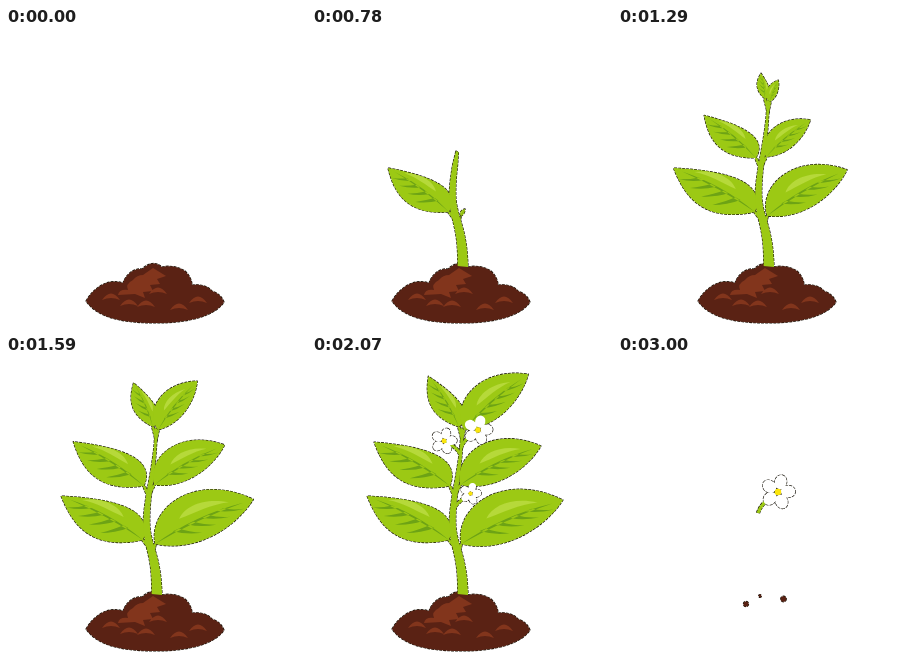
Recreate the animation shown at these times as an HTML page with a canvas. Size 300 by 300 pixels, loop 3.03 s.

```html
<!DOCTYPE html>
<html lang="en">
<head>
<meta charset="utf-8">
<title>Growing plant</title>
<style>
html, body { margin: 0; width: 100%; height: 100%; overflow: hidden; background: #fff; }
canvas { display: block; width: 300px; height: 300px; }
</style>
</head>
<body>
<canvas id="stage" width="300" height="300"></canvas>
<script>
const ctx = document.getElementById('stage').getContext('2d');
const LOOP = 3030, STEP = 30, FLASH = 3000;
const GREEN = '#9cc914', SHADE = '#6da315', LIGHT = '#b6d93a';
const SOIL = '#5a2214', CLOD = '#82351c', INK = '#161208';
const GROUND = 239, CROWN = 72;

const mound = new Path2D('M80 273C85 264 94 256 104 254Q111 253 117 255C120 246 128 240 136 241Q147 231 156 239C164 237 173 239 179 243Q186 250 186 257C194 256 202 258 206 263Q215 266 218 274C210 287 185 295 150 295C112 295 90 288 80 273Z');
const clods = new Path2D('M147 240L160 248L151 251L154 256L144 257L147 263L137 264L139 270L129 266L112 267Q113 261 122 262Q119 256 127 252Q131 247 137 247Z');
for (const [x, y] of [[105, 272], [123, 278], [140, 279], [152, 266], [173, 282], [192, 275]]) {
  clods.moveTo(x - 9, y);
  clods.quadraticCurveTo(x, y - 13, x + 9, y);
  clods.quadraticCurveTo(x, y - 4, x - 9, y);
}

// Leaf shapes run from the base (0, 0) to the tip (1, 0), upper side positive.
const shine = new Path2D('M.3 .12C.4 .21 .6 .2 .78 .07C.62 .12 .46 .11 .3 .12Z');
const leftLeaf = {
  edge: new Path2D('M0 0C.05 .34 .45 .26 1 0C.76 -.2 .45 -.38 0 0Z'),
  veins: veins(.16)
};
const rightLeaf = {
  edge: new Path2D('M0 0C.08 .34 .62 .45 1 0C.8 -.14 .35 -.26 0 0Z'),
  veins: veins(.09)
};

const leaves = [
  { base: [137, 184], tip: [55, 140], start: 270 },
  { base: [149, 188], tip: [251, 144], start: 750 },
  { base: [138, 130], tip: [62, 86], start: 830 },
  { base: [148, 129], tip: [229, 90], start: 940 },
  { base: [147, 71], tip: [116, 20], start: 1080 },
  { base: [152, 74], tip: [218, 18], start: 1170 }
];
const flowers = [
  { joint: [148, 98], center: [132, 85], start: 1700 },
  { joint: [149, 92], center: [166, 74], start: 1600 },
  { joint: [140, 157], center: [160, 136], start: 1795 }
];
const crumbs = [[128, 248, 2.6], [142, 240, 1.4], [165.5, 243, 2.8]];

const mix = (a, b, k) => a + (b - a) * k;

// Ease-out share of full size, for leaves and flowers alike
function grown(t, start, span) {
  const k = Math.min(1, Math.max(0, (t - start) / span));
  return 1 - (1 - k) ** 3;
}

function stemX(y) {
  const d = (y - 168) / (y > 168 ? 34 : 58);
  return 151 - 10.5 * Math.exp(-d * d);
}

function veins(depth) {
  const p = new Path2D('M0 0Q.45 .09 .9 .01Q.45 .05 0 0Z');
  for (let x = .2; x < .7; x += .15) {
    const drop = -depth * (1.15 - x);
    p.moveTo(x, .04);
    p.quadraticCurveTo(x + .1, drop * .5, x + .24, drop);
    p.quadraticCurveTo(x + .13, drop * .3, x + .06, .04);
  }
  return p;
}

function place(path, matrix) {
  const p = new Path2D();
  p.addPath(path, matrix);
  return p;
}

function leafParts({ base: [x, y], tip, start }, t) {
  const g = grown(t, start, 1200);
  if (!g) return [];
  const dx = tip[0] - x, dy = tip[1] - y, len = Math.hypot(dx, dy) * g;
  const side = dx < 0 ? 1 : -1;
  const shape = dx < 0 ? leftLeaf : rightLeaf;
  const lift = 40 * (1 - g) * side;   // young leaves point higher
  const m = new DOMMatrix().translate(x, y)
    .rotate(Math.atan2(dy, dx) * 180 / Math.PI + lift)
    .scale(len, len * side);
  const stalk = new Path2D();
  stalk.moveTo(stemX(y + 11), y + 11);
  stalk.lineTo(x, y);
  return [
    { path: stalk, color: GREEN, width: Math.min(2.6, len / 10) },
    { path: place(shape.edge, m), color: GREEN },
    { path: place(shine, m), color: LIGHT, bare: true },
    { path: place(shape.veins, m), color: SHADE, bare: true }
  ];
}

function stemParts(t) {
  const top = Math.max(CROWN, 240 - t * .15);
  if (top > GROUND - 2) return [];
  const half = y => Math.min(Math.max(1.3, 5.2 - (GROUND - y) * .026), 1.3 + (y - top) * .09);
  const path = new Path2D();
  for (let y = top; y < GROUND; y++) path.lineTo(stemX(y) - half(y), y);
  for (let y = GROUND; y > top; y--) path.lineTo(stemX(y) + half(y), y);
  path.closePath();
  return [{ path, color: GREEN }];
}

function flowerParts({ joint, center, start }, t) {
  const s = grown(t, start, 1000);
  if (!s) return [];
  const k = Math.min(1, s * 1.5);
  const [x, y] = joint.map((v, i) => mix(v, center[i], k));
  const stalk = new Path2D(), petals = new Path2D(), eye = new Path2D();
  stalk.moveTo(...joint);
  stalk.quadraticCurveTo(mix(joint[0], x, .15), mix(joint[1], y, .5), x, y);
  for (let i = 0; i < 5; i++) {
    const a = (i * 72 - 3) * Math.PI / 180;
    const petal = new DOMMatrix().translate(x, y).scale(s).rotate(i * 72 - 3).translate(10.2, 0);
    const oval = new Path2D();
    oval.ellipse(0, 0, 7.2, 6, 0, 0, Math.PI * 2);
    petals.addPath(oval, petal);
  }
  eye.arc(x, y, 3.2 * s, 0, Math.PI * 2);
  return [
    { path: stalk, color: GREEN, width: 3 * k },
    { path: petals, color: '#fff' },
    { path: eye, color: '#fbe50c', bare: true }
  ];
}

function crumbPart([x, y, r]) {
  const path = new Path2D();
  path.arc(x, y, r, 0, Math.PI * 2);
  return { path, color: SOIL };
}

// Outlines go below every fill, so only the outer edge shows.
function paint(parts) {
  ctx.strokeStyle = INK;
  ctx.setLineDash([3, 1]);
  for (const p of parts) {
    if (p.bare) continue;
    ctx.lineWidth = (p.width || 0) + 1.2;
    ctx.stroke(p.path);
  }
  ctx.setLineDash([]);
  for (const p of parts) {
    if (p.width) {
      ctx.strokeStyle = p.color;
      ctx.lineWidth = p.width;
      ctx.stroke(p.path);
    } else {
      ctx.fillStyle = p.color;
      ctx.fill(p.path);
    }
  }
}

function scene(t) {
  if (t >= FLASH) return [...crumbs.map(crumbPart), ...flowerParts(flowers[2], t)];
  return [
    { path: mound, color: SOIL },
    { path: clods, color: CLOD, bare: true },
    ...leaves.flatMap(l => leafParts(l, t)),
    ...stemParts(t),
    ...flowers.flatMap(f => flowerParts(f, t))
  ];
}

ctx.lineJoin = 'round';
const begin = performance.now();
function draw() {
  const t = Math.floor((performance.now() - begin) % LOOP / STEP) * STEP;
  ctx.fillStyle = '#fff';
  ctx.fillRect(0, 0, 300, 300);
  paint(scene(t));
  requestAnimationFrame(draw);
}
draw();
</script>
</body>
</html>
```
